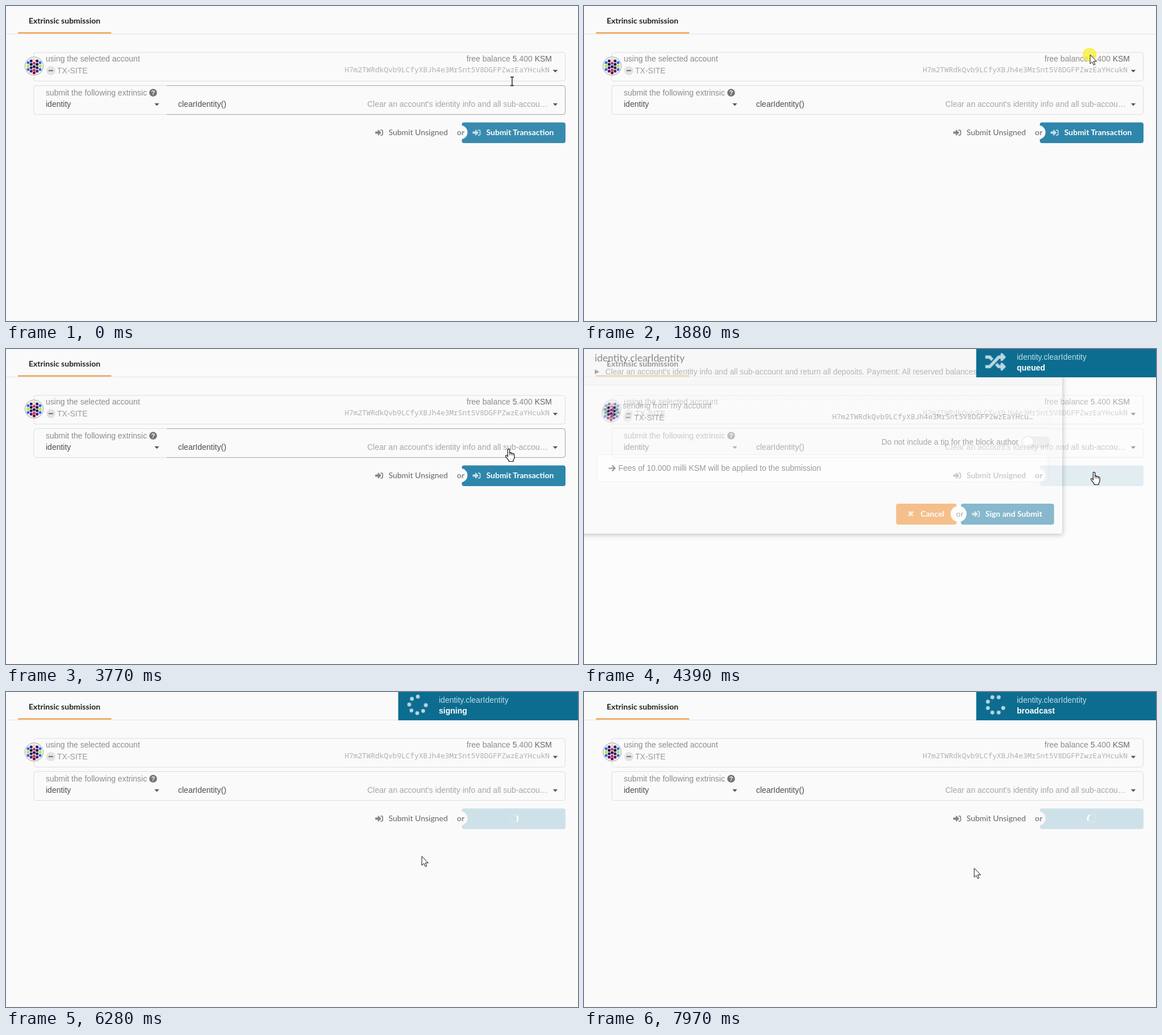
An HTML page that plays this animation: 1007x556 px, repeating every 8 s.

```html
<!DOCTYPE html>
<html lang="en">
<head>
<meta charset="utf-8">
<title>Extrinsic submission</title>
<style>
html, body { margin: 0; width: 100%; height: 100%; overflow: hidden; background: #fafafa; }
svg { display: block; width: 1007px; height: 556px; }
text { font: 14px "Liberation Sans", Arial, sans-serif; white-space: pre; }
.lato { font-family: Lato, sans-serif; }
.bold { font-weight: 700; }
.mono { font: 12.8px "Noto Sans Mono", monospace; }
.snug { font-size: 13.87px; }
.mid { text-anchor: middle; }
.end { text-anchor: end; }
.box { fill: none; stroke: #dedede; }
.dark { fill: none; stroke: #a2a2a2; }

.loop { animation: 8s linear infinite; }
.cut { animation: 8s step-end infinite; }

#cursor { animation-name: travel; }
@keyframes travel {
  0%, 1.125% { transform: translate(891px, 133px); }
  4.375% { transform: translate(894px, 100px); }
  7.875%, 10.75% { transform: translate(895px, 91px); }
  16.875%, 19.625% { transform: translate(966px, 92px); }
  23.5%, 25.375% { transform: translate(891px, 86px); }
  31.25%, 33.125% { transform: translate(966px, 92px); }
  37.125%, 39% { transform: translate(896px, 87px); }
  40.875%, 44.875% { transform: translate(892px, 83px); }
  47.125%, 48% { transform: translate(885px, 176px); }
  51.875%, 59.625% { transform: translate(898px, 217px); }
  63.75%, 64.75% { transform: translate(792px, 310px); }
  66% { transform: translate(766px, 318px); }
  68.875%, 69.75% { transform: translate(742px, 311px); }
  73.625%, 79.5% { transform: translate(732px, 290px); }
  84.875%, 85.625% { transform: translate(722px, 534px); }
  94.75%, 95.75% { transform: translate(710px, 308px); }
  99.6%, 100% { transform: translate(687px, 311px); }
}
#beam { animation-name: beam; }
@keyframes beam { 0% { opacity: 1; } 12.5%, 100% { opacity: 0; } }
#hand { animation-name: hand; }
@keyframes hand {
  0%, 20.6%, 34.5%, 64.8%, 76%, 100% { opacity: 0; }
  14.4%, 28%, 46%, 70.5% { opacity: 1; }
}
#arrow { animation-name: arrow; }
@keyframes arrow {
  0%, 14.4%, 28%, 46%, 70.5% { opacity: 0; }
  12.5%, 20.6%, 34.5%, 64.8%, 76%, 100% { opacity: 1; }
}
#click { animation-name: click; }
@keyframes click { 0%, 22.4% { opacity: 0; } 23.4%, 25.4% { opacity: 1; } 27%, 100% { opacity: 0; } }

#accountHover { animation-name: accountHover; }
@keyframes accountHover {
  0%, 13.5% { opacity: 0; } 15.5%, 20% { opacity: 1; }
  22%, 27.5% { opacity: 0; } 29.5%, 33.5% { opacity: 1; } 35.5%, 100% { opacity: 0; }
}
#callHover { animation-name: callHover; }
@keyframes callHover {
  0%, 1.1% { opacity: 1; } 4%, 45.5% { opacity: 0; }
  46.5%, 49.5% { opacity: 1; } 51.5%, 100% { opacity: 0; }
}
#submit { animation-name: submit; }
@keyframes submit {
  0%, 1.1% { opacity: .95; } 4%, 50.5% { opacity: 1; }
  52%, 53.7% { opacity: .8; } 54.5%, 100% { opacity: .21; }
}
#submitLabel { animation-name: hideLate; }
@keyframes hideLate { 0% { opacity: 1; } 54%, 100% { opacity: 0; } }
#loader, #notice { animation-name: showLate; }
@keyframes showLate { 0% { opacity: 0; } 54%, 100% { opacity: 1; } }

#modal { animation-name: modal; }
@keyframes modal { 0%, 53.7% { opacity: 0; } 55.8%, 75.5% { opacity: 1; } 77%, 100% { opacity: 0; } }
#sign { animation-name: sign; }
@keyframes sign {
  0%, 62% { opacity: 1; } 63.4%, 65% { opacity: .8; }
  66.5%, 70% { opacity: 1; } 72%, 100% { opacity: .8; }
}

.queued { animation-name: queued; }
@keyframes queued { 0% { opacity: 1; } 76%, 100% { opacity: 0; } }
#signing { animation-name: signing; }
@keyframes signing { 0%, 92%, 100% { opacity: 0; } 76% { opacity: 1; } }
#broadcast { animation-name: broadcast; }
@keyframes broadcast { 0% { opacity: 0; } 92%, 100% { opacity: 1; } }
#dots { animation-name: dots; }
@keyframes dots { 0% { opacity: 0; } 76%, 100% { opacity: 1; } }
#dotSpin { animation: dotSpin 1.6s linear infinite; }
@keyframes dotSpin { from { transform: rotate(29deg); } to { transform: rotate(389deg); } }
#arcSpin { animation: arcSpin calc(8s / 12) linear infinite; }
@keyframes arcSpin { from { transform: rotate(209deg); } to { transform: rotate(569deg); } }
</style>
</head>
<body>
<svg viewBox="0 0 1007 556">
  <defs>
    <g id="enter">
      <path d="M9.3 2.6h2.200a1.600 1.600 0 0 1 1.600 1.600v5.600a1.600 1.600 0 0 1-1.600 1.600H9.300" fill="none" stroke="currentColor" stroke-width="1.700"/>
      <path d="M.6 5.100h4V2.400q0-1.200 1-.4l4.600 4.500q.6.500 0 1L5.600 12q-1 .8-1-.4V8.900h-4Q0 8.900 0 8.300V5.700q0-.6.6-.6Z" fill="currentColor"/>
    </g>
    <path id="caret" d="M-4.200-2.200h8.400L0 2.200Z" fill="#555"/>
    <g id="account">
      <circle cx="49.5" cy="106" r="16.3" fill="#eee" stroke="#aaa"/>
      <g stroke-width="5" stroke-linecap="round">
        <path d="M39 100h0M60 100h0M39 112h0M60 112h0" stroke="#2b69e0"/>
        <path d="M39 106h0M60 106h0" stroke="#b8e52c"/>
        <path d="M44.3 97h0M54.7 97h0M44.3 109h0M54.7 109h0" stroke="#2a1a78"/>
        <path d="M44.3 103h0M54.7 103h0M49.5 107h0" stroke="#160d38"/>
        <path d="M44.3 115h0M54.7 115h0" stroke="#5c1069"/>
        <path d="M49.5 101h0M49.5 113h0" stroke="#d92763"/>
        <path d="M49.5 95h0" stroke="#f4d5a5"/>
        <path d="M49.5 118h0" stroke="#6c1230"/>
      </g>
      <circle cx="79" cy="114" r="8" fill="#e3e3e3"/>
      <path d="M75 114h8" stroke="#777" stroke-width="2.2"/>
      <text x="90" y="119" fill="currentColor">TX-SITE</text>
    </g>
  </defs>

  <rect width="1007" height="556" fill="#fafafa"/>
  <path d="M0 49.5H1007" stroke="#e5e5e5"/>
  <path d="M21 47.5H185.5" stroke="#f19135" stroke-width="2"/>
  <text class="lato bold" x="40" y="31" fill="#222">Extrinsic submission</text>

  <rect class="box" x="49" y="82" width="935.5" height="50.5" rx="4"/>
  <rect id="accountHover" class="dark loop" x="49" y="82" width="935.5" height="50.5" rx="4"/>
  <text x="70" y="98" fill="#8c8c8c">using the selected account</text>
  <use href="#account" color="#9b9b9b"/>
  <text class="end" x="961" y="98" fill="#8c8c8c">free balance <tspan fill="#707070">5</tspan>.400 <tspan fill="#666">KSM</tspan></text>
  <text class="mono end" x="957" y="117" fill="#b0b0b0">H7m2TWRdkQvb9LCfyXBJh4e3MrSnt5V8DGFPZwzEaYHcukN</text>
  <use href="#caret" x="967" y="115"/>

  <rect class="box" x="49" y="140.5" width="935.5" height="51" rx="4"/>
  <path id="callHover" class="dark loop" d="M283 140.5H980.5a4 4 0 0 1 4 4V187.5a4 4 0 0 1-4 4H283"/>
  <text x="70" y="158" fill="#8c8c8c">submit the following extrinsic</text>
  <circle cx="259" cy="153" r="6.8" fill="#737373"/>
  <text class="bold mid" x="259" y="157.2" fill="#fafafa" style="font-size:11.5px">?</text>
  <text x="70" y="178" fill="#4e4e4e">identity</text>
  <use href="#caret" x="265.5" y="174"/>
  <text x="303" y="178" fill="#4e4e4e">clearIdentity()</text>
  <text x="636" y="178" fill="#a6a6a6">Clear an account's identity info and all sub-accou…</text>
  <use href="#caret" x="967" y="174"/>

  <use href="#enter" x="650" y="216.5" color="#858585"/>
  <text class="lato" x="673.5" y="228" fill="#666">Submit Unsigned</text>
  <rect id="submit" class="loop" x="802.5" y="205.5" width="182.5" height="36.5" rx="4" fill="#2e86ab"/>
  <g id="submitLabel" class="cut">
    <use href="#enter" x="821.5" y="216.5" color="#c4dee9"/>
    <text class="lato bold" x="845.5" y="228" fill="#fff">Submit Transaction</text>
  </g>
  <g id="loader" class="cut">
    <g transform="translate(894 223.5)" fill="none" stroke="#fff" stroke-width="2.5">
      <circle r="7.2" opacity=".15"/>
      <path id="arcSpin" d="M5.1-5.1A7.2 7.2 0 0 1 5.1 5.1"/>
    </g>
  </g>
  <circle cx="800" cy="223" r="12.5" fill="#fafafa"/>
  <text class="lato bold mid" x="800.5" y="228" fill="#858585">or</text>

  <g id="modal" class="loop">
    <rect width="1007" height="556" fill="#fff" opacity=".74"/>
    <rect x="-10" y="-10" width="852" height="336" rx="3" fill="#fafafa" style="filter:drop-shadow(1px 2px 4px rgba(0,0,0,.4))"/>
    <rect width="842" height="63" fill="#f5f5f5"/>
    <path d="M0 63.5H842" stroke="#dcdcdc"/>
    <text class="lato" x="18.7" y="22" fill="#333" style="font-size:17.5px">identity.clearIdentity</text>
    <path d="M19 36l8 4.3-8 4.300Z" fill="#666"/>
    <text class="snug" x="37.5" y="45" fill="#808080">Clear an account's identity info and all sub-account and return all deposits. Payment: All reserved balances on</text>
    <rect x="48.5" y="88.5" width="771.5" height="50.5" rx="3" fill="none" stroke="#e3e3e3" stroke-dasharray="2 2"/>
    <text x="68" y="105" fill="#7c7c7c">sending from my account</text>
    <use href="#account" x="-2" y="7" color="#666"/>
    <text class="mono" x="437" y="124" fill="#777">H7m2TWRdkQvb9LCfyXBJh4e3MrSnt5V8DGFPZwzEaYHcu…</text>
    <text class="snug end" x="765" y="169" fill="#666">Do not include a tip for the block author</text>
    <rect x="771" y="154" width="49.5" height="20.5" rx="10.25" fill="#e6e6e6"/>
    <circle cx="781.5" cy="164.2" r="10" fill="#fff" stroke="#d0d0d0"/>
    <rect x="23.5" y="186.5" width="793.5" height="48" rx="2" fill="#fff" stroke="#ececec"/>
    <path d="M43.5 210.5H54M49.5 205.5l5 5-5 5" fill="none" stroke="#444" stroke-width="2"/>
    <text class="snug" x="60.5" y="215" fill="#4e4e4e">Fees of 10.000 milli KSM will be applied to the submission</text>

    <rect x="549.5" y="273" width="106.5" height="37" rx="4" fill="#f19135"/>
    <path d="M571.5 287l7.500 7.500M579 287l-7.500 7.500" stroke="#fbdfc4" stroke-width="3.2"/>
    <text class="lato bold" x="592.5" y="296" fill="#fff">Cancel</text>
    <g id="sign" class="loop">
      <rect x="663.5" y="273" width="164" height="37" rx="4" fill="#2e86ab"/>
      <use href="#enter" x="683" y="284.3" color="#c4dee9"/>
      <text class="lato bold" x="706.5" y="296" fill="#fff">Sign and Submit</text>
    </g>
    <circle cx="659.5" cy="291" r="14" fill="#fff"/>
    <text class="lato mid" x="661.5" y="296" fill="#777">or</text>
  </g>

  <g id="notice" class="cut">
    <rect x="690.5" width="316.5" height="50" fill="#0c6d90"/>
    <text x="762" y="19" fill="#c3dbe4">identity.clearIdentity</text>
    <g fill="#fff">
      <text id="queued" class="bold queued cut" x="762" y="38">queued</text>
      <text id="signing" class="bold cut" x="762" y="38">signing</text>
      <text id="broadcast" class="bold cut" x="762" y="38">broadcast</text>
    </g>
    <g class="queued cut">
      <path transform="translate(706.5 4.7) scale(.0703)" fill="#b9d6e1" d="M0 96H127L202 175 149 232 96 176H0ZM0 336H96L320 96H384V56Q390 25 425 39L505 119Q512 136 505 153L425 233Q390 247 384 216V176H352L127 416H0ZM245 337L299 279 352 336H384V296Q390 265 425 279L505 359Q512 376 505 393L425 473Q390 487 384 456V416H320Z"/>
    </g>
    <g id="dots" class="cut">
      <g transform="translate(724.5 22.7)">
        <path id="dotSpin" d="M0-14.600h0M-10.300-10.300h0M-14.600 0h0M-10.300 10.300h0M0 14.600h0M10.300 10.300h0M14.600 0h0" fill="none" stroke="#b9d6e1" stroke-width="6.8" stroke-linecap="round"/>
      </g>
    </g>
  </g>

  <g id="cursor" class="loop">
    <circle id="click" class="loop" cx="-1" cy="0" r="12.3" fill="#f7ee2e" fill-opacity=".75"/>
    <path id="beam" class="cut" d="M-3-7.500h2.300L0-7l.7-.5H3M0-7V7M-3 7.500h2.300L0 7l.7.500H3" fill="none" stroke="#111" stroke-width="1.3"/>
    <path id="arrow" class="cut" d="M0 0V16L3.700 12.600 6.300 18.300 8.700 17.200 6.200 11.700H11.300Z" fill="#fff" stroke="#111"/>
    <g id="hand" class="cut" stroke="#111" stroke-linejoin="round">
      <path d="M-1.700 14V2Q-1.700.3 0 .3T1.700 2V7.500Q3.300 6.300 4.700 8 6.300 7 7.600 9 10 8.300 10 11V15.500Q10 18 8 20V22.500H.2V20.800L-5.300 13.800Q-6 12-4.300 11.500-3.300 11.300-1.700 14Z" fill="#fff" stroke-width="1.2"/>
      <path d="M1.700 7.500v4M4.700 8v3.500M7.600 9v3" stroke-width=".9"/>
    </g>
  </g>
</svg>
</body>
</html>
```
